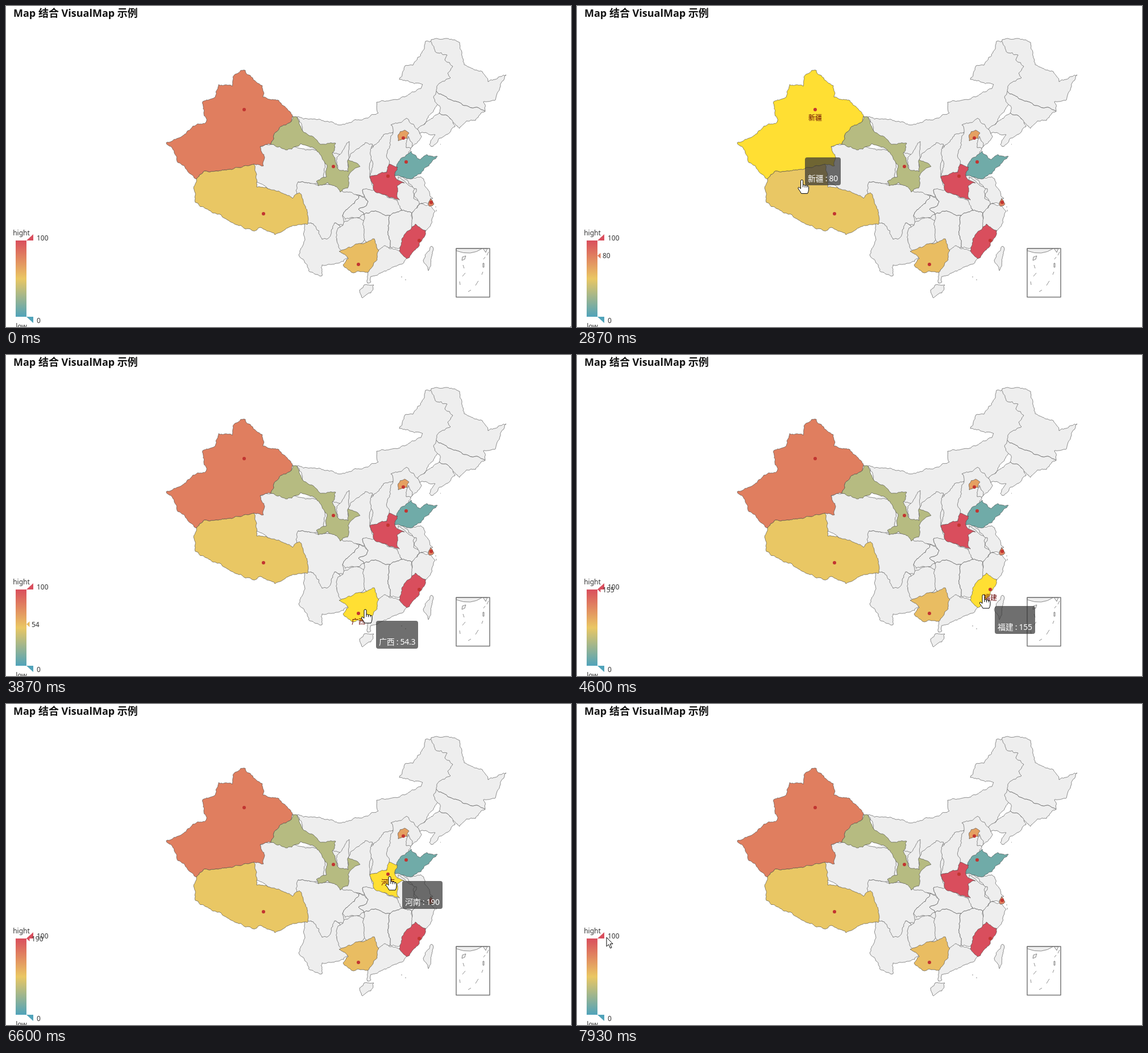
An HTML page that plays this animation: 994x564 px, repeating every 8 s.

```html
<!DOCTYPE html>
<html lang="zh">
<head>
<meta charset="utf-8">
<title>Map</title>
<style>
html, body { margin: 0; width: 100%; height: 100%; overflow: hidden; background: #fff; }
body, text { font-family: "Noto Sans", "Noto Sans CJK SC", "Noto Sans CJK", sans-serif; }
svg { position: absolute; left: 0; top: 0; }
text { font-size: 12px; fill: #333; dominant-baseline: central; }
#map, #sea { fill: #eee; stroke: #444; stroke-width: .6; stroke-linejoin: round; }
#tip { position: absolute; left: 0; top: 0; height: 39px; padding: 5px; border-radius: 4px;
  background: rgba(50,50,50,.7); color: #fff; font-size: 14px; line-height: 21px;
  letter-spacing: -.3px; white-space: pre; }
</style>
</head>
<body>
<svg id="stage" width="994" height="564">
<defs>
<linearGradient id="ramp" x2="0" y2="1">
<stop stop-color="#d94e5d"/><stop offset=".5" stop-color="#eac763"/><stop offset="1" stop-color="#50a3ba"/>
</linearGradient>
</defs>
<text x="13" y="12" style="font-size:18px;font-weight:700;fill:#111">Map 结合 VisualMap 示例</text>

<!-- Later regions cover earlier ones, so each border is outlined closely only once -->
<g id="map">
<path d="M500,255L690,215L730,335L700,415L640,440L560,440L530,380z" stroke="none"/>
<polygon points="512,195 555,201 587,209 633,197 655,188 652,169 690,164 730,145 733,138 692,129 702,105 716,104 736,75 738,62 760,58 790,100 770,165 725,220 660,240 600,268 530,235"/>
<polygon points="748,59 776,57 798,64 806,103 835,114 848,133 880,121 861,165 840,168 843,185 806,175 757,150 762,136 782,126 777,118 786,106 772,95 776,86 755,80"/>
<polygon points="757,150 806,175 843,185 826,201 810,202 798,215 780,196 762,188 764,178 752,160"/>
<polygon points="762,188 780,196 790,212 766,232 748,247 745,243 755,226 725,224 727,213"/>
<polygon points="466,243 565,255 560,310 530,311 514,309 518,328 495,345 430,300 448,247"/>
<polygon data-name="云南" data-at="566,424" points="524,380 560,385 580,381 590,390 582,411 595,434 602,443 584,452 556,455 556,474 534,467 530,455 515,437 526,410"/>
<polygon data-name="四川" data-at="579,351" points="514,309 530,311 590,315 622,333 608,350 592,368 594,385 578,381 568,407 556,410 541,383 525,380 512,330"/>
<polygon data-name="贵州" data-at="604,404" points="582,396 597,378 615,370 630,378 632,410 600,432 588,428 582,411"/>
<polygon points="622,333 637,343 634,351 620,357 630,366 615,372 597,375 592,368 608,350"/>
<polygon points="645,243 640,300 650,325 628,322 631,335 592,326 590,295 607,259 632,240"/>
<polygon points="681,222 690,285 640,300 645,280 641,252 664,226"/>
<polygon points="604,238 603,268 602,292 585,290 582,266 594,252"/>
<polygon data-name="湖北" data-at="678,353" points="628,322 650,324 692,345 696,359 676,368 650,360 630,366 620,357 634,351 637,343 631,335"/>
<polygon data-name="湖南" data-at="665,383" points="630,366 650,360 676,368 673,392 676,424 656,430 633,414 630,395"/>
<polygon data-name="江西" data-at="694,377" points="676,368 696,359 714,364 718,380 700,425 676,424 673,392"/>
<polygon data-name="广东" data-at="668,449" points="640,440 667,421 710,436 700,451 674,463 642,475 642,485 636,487"/>
<polygon data-name="安徽" data-at="707,336" points="690,300 720,320 717,338 730,345 714,364 696,359 680,330"/>
<polygon data-name="江苏" data-at="722,334" points="697,300 730,300 751,338 743,347 727,348 718,333 722,321"/>
<polygon data-name="浙江" data-at="735,356" points="727,348 745,350 755,361 749,381 738,396 715,390 714,364"/>
<polygon data-name="河北" data-at="680,256" points="677,209 705,197 723,216 731,229 712,250 708,262 700,285 674,278 671,255 681,222"/>
<polygon points="622,499 630,490 647,490 642,504 627,513"/>
<polygon points="748,422 752,427 743,465 734,447"/>
<polygon data-name="新疆" data-value="80" data-at="419,182" points="413,113 421,113 427,121 451,140 452,160 480,166 504,193 502,203 474,222 466,243 447,247 455,265 453,281 436,278 385,288 349,290 335,304 300,269 296,258 282,240 306,231 337,207 352,204 346,168 368,160 374,138 398,141 401,122"/>
<polygon data-name="西藏" data-value="49.6" data-at="453,365" points="349,290 385,288 436,278 441,296 441,318 484,328 504,338 516,328 523,343 530,366 530,384 508,386 473,402 447,389 434,395 404,384 372,366 333,345 330,320 335,304"/>
<polygon data-name="甘肃" data-value="33" data-at="576,282" points="504,194 512,195 524,222 541,230 553,243 580,241 574,258 587,289 602,291 602,270 623,282 604,295 601,320 588,327 566,310 549,316 546,308 564,300 565,280 545,252 518,242 495,253 466,243 474,222 502,203"/>
<polygon data-name="广西" data-value="54.3" data-at="620,454" points="586,431 618,418 648,409 656,430 650,449 634,468 611,469 593,455 602,444"/>
<polygon data-name="福建" data-value="155" data-at="727,412" points="720,383 738,394 725,424 705,444 692,430 700,403"/>
<polygon data-name="山东" data-value="10.5" data-at="704,274" points="713,255 729,270 740,261 759,264 733,290 712,304 684,298 690,275"/>
<polygon data-name="河南" data-value="190" data-at="672,299" points="640,300 670,292 674,278 689,283 684,298 701,311 688,316 692,341 650,327"/>
<polygon data-name="北京" data-value="66" data-at="699,232" points="701,218 709,223 706,233 690,237 690,226"/>
<polygon data-name="天津" data-at="711,231" points="708,229 715,241 712,250 704,249 705,236"/>
<polygon data-name="上海" data-value="78" data-at="748,345" points="747,338 753,348 745,352 743,347"/>
</g>

<g id="sea">
<path d="M695,476h2M702,481h2M764,243h1M755,353h2M757,358v3"/>
<path d="M792,426H838Q818,440 792,430zM839,426l5,7 3,-7z"/>
<path d="M803,441l6,-2-2,6-5,2zM839,452h2v7h-2zM840,445l3,-4M846,438l3,-6M804,455l2,6M803,475l5,-6M837,472l2,-5M826,491l5,-8M798,484l1,6M813,502l5,-3"/>
<rect x="792" y="426" width="59" height="85.5" fill="none" stroke="#777" stroke-width="1.5"/>
</g>
<g id="dots" fill="#c23531"></g>
<text id="label" text-anchor="middle" style="fill:#640000"></text>

<rect x="17" y="412" width="19" height="134" fill="url(#ramp)"/>
<path d="M36,412H48V401z" fill="#d94e5d"/>
<path d="M36,546H48V557z" fill="#50a3ba"/>
<text x="27" y="398" text-anchor="middle">hight</text>
<text x="27" y="562" text-anchor="middle">low</text>
<text x="54" y="407">100</text>
<text x="54" y="552">0</text>
<g id="mark"><path d="M36,0l5.5,-5v10z"/><text x="45"></text></g>
<rect id="corner" x="993" y="563" width="1" height="1" fill="#222"/>
</svg>

<div id="tip"></div>

<svg width="994" height="564">
<g id="cursor" fill="#fff" stroke="#000" stroke-linejoin="round">
<path id="hand" d="M-2,2Q-2,0 0,0Q2,0 2,2V9Q4,8 5.5,9.5Q8,9 9,10.5Q11.5,10 12,12.5V17Q12,20 10,24H-1Q-3,20 -6.5,15.5Q-7,13 -5,13L-2,15.5zM2,9v4M5.5,9.5v4M9,10.5v3"/>
<path id="arrow" d="M0,0V16L3.7,12.5L6.5,19L9,18L6.3,11.5H11z"/>
</g>
</svg>

<script>
const LOOP = 8000, STEP = 200 / 3, ENTER = 1650, TIP_LAG = 140, HOVER_LAG = 50;
const $ = id => document.getElementById(id);
const show = (el, on) => { el.style.display = on ? '' : 'none'; };
const mix = (a, b, p) => a.map((v, i) => v + (b[i] - v) * p);

// Pointer stops: time, x, y
const stops = [
  [1600, 650, 570], [2400, 381, 246], [2740, 381, 246], [2870, 396, 307], [3330, 423, 355],
  [3470, 497, 380], [3560, 605, 437], [3730, 632, 447], [4010, 632, 447], [4430, 715, 421],
  [4600, 715, 421], [5060, 712, 272], [5700, 711, 265], [5750, 708, 241], [5800, 708, 241],
  [6150, 697, 230], [6460, 677, 291], [6600, 675, 303], [7000, 590, 500], [7470, 83, 439],
  [7930, 52, 410]
];

function pointerAt(time) {
  const t = Math.min(Math.max(time, stops[0][0]), stops[stops.length - 1][0]);
  const i = Math.max(1, stops.findIndex(s => s[0] >= t));
  const [from, to] = [stops[i - 1], stops[i]];
  return mix(from, to, (t - from[0]) / (to[0] - from[0])).slice(1);
}

const noise = (x, y) => {
  const s = Math.sin(x * 12.99 + y * 78.23) * 43758.55;
  return s - Math.floor(s) - .5;
};

// Symmetric in a and b, so neighbours share the same ragged border
function ragged(a, b) {
  const len = Math.hypot(b[0] - a[0], b[1] - a[1]);
  if (len < 4) return [a];
  const amp = Math.min(len * .35, 4), sx = a[0] + b[0], sy = a[1] + b[1];
  const mid = [sx / 2 + noise(sx, sy) * amp, sy / 2 + noise(sy, sx) * amp];
  return [...ragged(a, mid), ...ragged(mid, b)];
}

const ramp = [[80, 163, 186], [234, 199, 99], [217, 78, 93]];
function colorOf(value) {
  const v = Math.min(value, 100) / 50, i = v < 1 ? 0 : 1;
  return `rgb(${mix(ramp[i], ramp[i + 1], v - i).map(Math.round)})`;
}

const regions = [...document.querySelectorAll('#map polygon')].map(el => {
  const corners = el.getAttribute('points').split(' ').map(p => p.split(',').map(Number));
  const outline = corners.flatMap((p, i) => ragged(p, corners[(i + 1) % corners.length]));
  el.setAttribute('points', outline.map(p => p.map(n => n.toFixed(1))).join(' '));
  const { name, value, at = '0,0' } = el.dataset;
  const [x, y] = at.split(',').map(Number);
  const fill = value ? colorOf(value) : '#eee';
  el.style.fill = fill;
  if (value) $('dots').insertAdjacentHTML('beforeend', `<circle cx="${x}" cy="${y}" r="3"/>`);
  return { el, name, value, x, y, fill };
});
const targets = regions.filter(r => r.name).reverse();

function regionAt([x, y]) {
  const point = $('stage').createSVGPoint();
  point.x = x;
  point.y = y;
  return targets.find(r => r.el.isPointInFill(point));
}

function showValue({ value, fill }) {
  const [arrow, text] = $('mark').children;
  $('mark').setAttribute('transform', `translate(0,${545.5 - Math.min(value, 100) * 1.335})`);
  arrow.style.fill = fill;
  text.textContent = Math.round(value);
}

function draw(time) {
  const t = Math.floor(time % LOOP / STEP + .1) * STEP;
  const active = t > ENTER;
  const hit = active && regionAt(pointerAt(t - HOVER_LAG));

  for (const r of targets) r.el.style.fill = r === hit ? '#ffdf33' : r.fill;
  show($('corner'), t < 530);
  show($('cursor'), active);
  show($('hand'), hit);
  show($('arrow'), !hit);
  show($('label'), hit);
  show($('tip'), hit);
  show($('mark'), hit && hit.value);
  $('cursor').setAttribute('transform', `translate(${pointerAt(t)})`);
  if (!hit) return;

  $('label').textContent = hit.name;
  $('label').setAttribute('x', hit.x);
  $('label').setAttribute('y', hit.y + 14.5);
  const [x, y] = pointerAt(t - TIP_LAG).map(v => Math.round(v + 20));
  $('tip').textContent = `\n${hit.name} : ${hit.value || '-'}`;
  $('tip').style.transform = `translate(${x}px,${y}px)`;
  if (hit.value) showValue(hit);
}

const start = performance.now();
function tick() {
  draw(performance.now() - start);
  requestAnimationFrame(tick);
}
tick();
</script>
</body>
</html>
```
